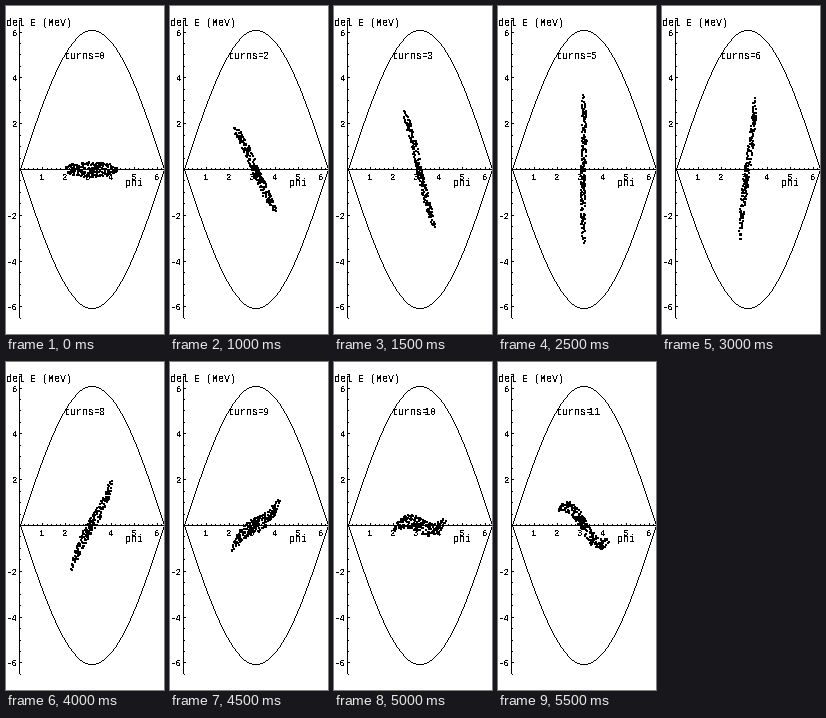
Animation of 158x328 px, one loop 6000 ms. Source, as a matplotlib script:

```python
import numpy as np
import matplotlib.pyplot as plt
from matplotlib.animation import FuncAnimation
from matplotlib.patches import Rectangle

WIDTH, HEIGHT, DPI = 158, 328, 64
PT = 72 / DPI  # points per pixel
X0, Y0 = 13, 163  # pixel of the origin
UNIT_X, UNIT_Y = 22.95, 22.9
E_HALF = 3.035  # half the bucket height in MeV
OMEGA = 0.332  # small-amplitude synchrotron phase advance per turn
TURNS, STEPS, COUNT = 12, 20, 230

plt.rcParams.update({
    "font.family": "Liberation Mono",
    "text.antialiased": False,
    "lines.antialiased": False,
})


def px(phi):
    return X0 + UNIT_X * phi


def py(energy):
    return Y0 - UNIT_Y * energy


def bar(x, y, w, h):
    """Fill whole pixels, starting at the pixel nearest (x, y)."""
    ax.add_patch(Rectangle((round(x), round(y)), w, h, facecolor="black",
                           lw=0, antialiased=False))


def hairline(xs, ys):
    """Draw a curve as a one-pixel trace, one pixel per row or column."""
    step = np.maximum(np.abs(np.diff(xs)), np.abs(np.diff(ys)))
    length = np.concatenate([[0], np.cumsum(step)])
    at = np.arange(0, length[-1], 1)
    ax.plot(np.rint(np.interp(at, length, xs)) + 0.5,
            np.rint(np.interp(at, length, ys)) + 0.5,
            ls="none", marker=",", color="black")


def label(x, baseline, text, ha="left", size=10):
    return ax.text(x, baseline, text, ha=ha, va="baseline",
                   fontsize=size * PT, color="black")


def initial_bunch():
    """Scatter the particles evenly over a flat ellipse."""
    rng = np.random.default_rng(7)
    radius = np.sqrt(rng.uniform(0, 1, COUNT))
    angle = rng.uniform(0, 2 * np.pi, COUNT)
    return 1.18 * radius * np.cos(angle), 0.34 * radius * np.sin(angle)


def track():
    """Leapfrog the pendulum equation and store the bunch once per turn."""
    delta, energy = initial_bunch()
    h = OMEGA / STEPS
    turns = []
    for _ in range(TURNS):
        turns.append((px(np.pi + delta) + 0.5, py(energy) + 0.5))
        for _ in range(STEPS):
            energy = energy - E_HALF * np.sin(delta) * h / 2
            delta = delta + energy / E_HALF * h
            energy = energy - E_HALF * np.sin(delta) * h / 2
    return turns


fig = plt.figure(figsize=(WIDTH / DPI, HEIGHT / DPI), dpi=DPI,
                 facecolor="white")
ax = fig.add_axes([0, 0, 1, 1])
ax.set(xlim=(0, WIDTH), ylim=(HEIGHT, 0))
ax.axis("off")

# Axes with ticks
bar(X0, Y0, WIDTH - X0, 1)
bar(X0, py(6.5), 1, 13 * UNIT_Y)
for i in range(1, 32):
    size = 2 if i % 5 == 0 else 1
    bar(px(i / 5), Y0 - size, 1, size)
for i in range(-13, 14):
    bar(X0 + 1, py(i / 2), 2 if i % 4 == 0 else 1, 1)
for n in range(1, 7):
    label(px(n) + 0.5, 174, str(n), "center", 9)
for n in (-6, -4, -2, 2, 4, 6):
    label(11.5, py(n) + 4, str(n), "right", 9)

# Separatrix
phi = np.linspace(0, 2 * np.pi, 400)
for sign in (1, -1):
    hairline(px(phi), py(sign * 2 * E_HALF * np.sin(phi / 2)))

label(0, 20, "del E (MeV)")
label(119, 180, "phi")
label(58, 53, "turns=")
counter = label(96.5, 53, "0", "center")

bunch = track()
dots, = ax.plot([], [], "s", ms=2 * PT, mew=0, color="black")


def draw(turn):
    dots.set_data(*bunch[turn])
    counter.set_text(str(turn))
    return dots, counter


anim = FuncAnimation(fig, draw, frames=TURNS, interval=500, repeat=True)
plt.show()
```
